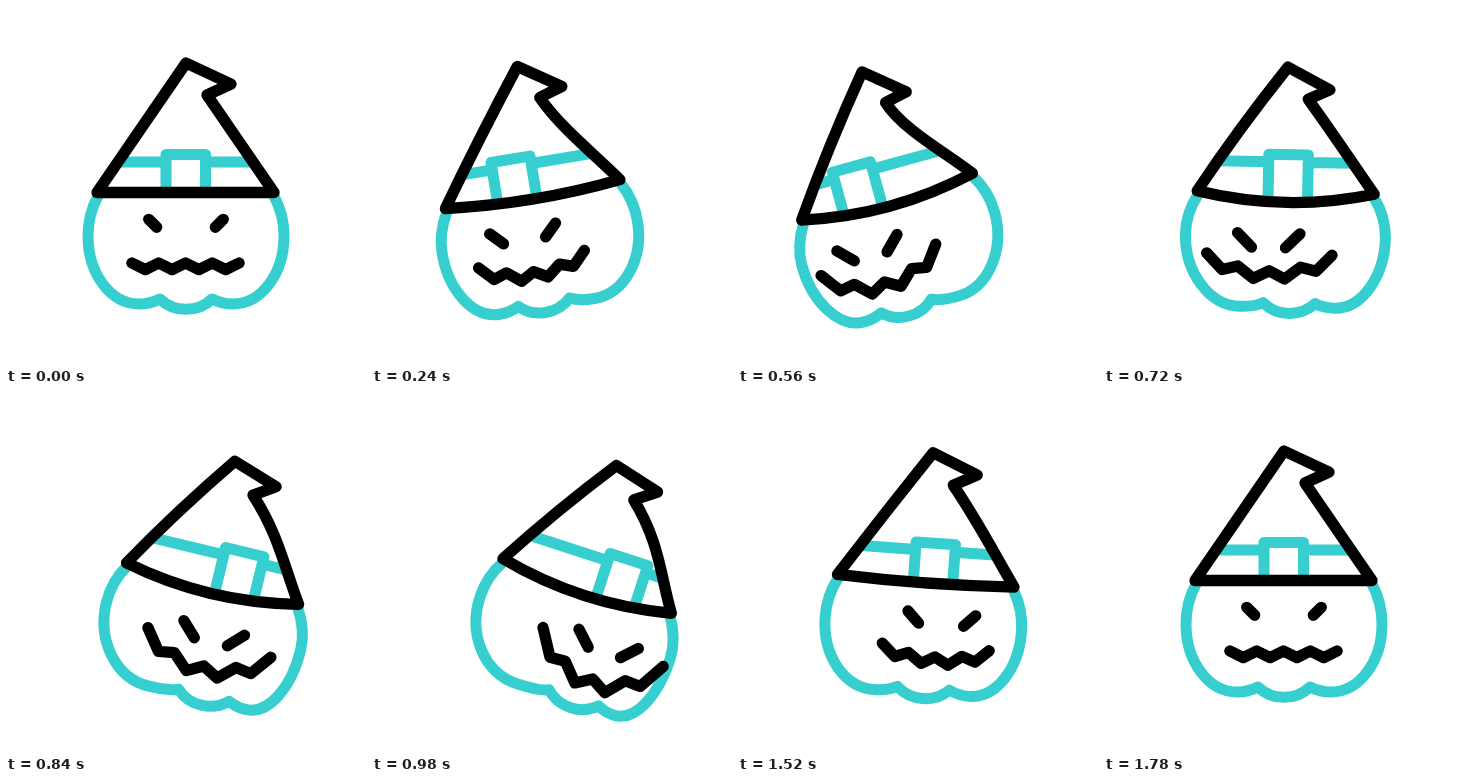
An HTML page for the animation above (2.4 s loop, 360 by 360 pixels).

```html
<!DOCTYPE html>
<html lang="en">
<head>
<meta charset="utf-8">
<title>Pumpkin in a hat</title>
<style>
html, body { margin: 0; width: 100%; height: 100%; overflow: hidden; background: #fff; }
svg { display: block; width: 100vw; height: 100vh; }
path { fill: none; stroke: #000; stroke-width: 11.3; stroke-linecap: round; stroke-linejoin: round; }
.teal { stroke: #36cece; stroke-width: 11; }
#belt { stroke-linecap: butt; }
</style>
</head>
<body>
<svg viewBox="0 0 360 360">
  <g id="head">
    <path id="body" class="teal"/>
    <path id="belt" class="teal"/>
    <path id="hat"/>
    <path id="eyes"/>
    <path id="mouth"/>
  </g>
</svg>
<script>
const LOOP = 2400, STEP = 20, END = 1770, MID = 180;

const el = id => document.getElementById(id);
const setPath = (id, d) => el(id).setAttribute('d', d);
const pt = (x, y) => x.toFixed(2) + ' ' + y.toFixed(2) + ' ';

// 0 before a, 1 after b, smooth between
function ease(t, a, b) {
  const p = Math.min(1, Math.max(0, (t - a) / (b - a)));
  return p * p * (3 - 2 * p);
}

// lean left, swing over to the right, settle back; the face follows later than the body
function poseAt(t) {
  return {
    tilt: -18.5 * ease(t, 0, 475) + 36.5 * ease(t, 475, 942) - 18 * ease(t, 960, END),
    sag: ease(t, 0, 480) - ease(t, 960, END),
    eyeX: -32 * ease(t, 0, 480) + 70 * ease(t, 590, 1020) - 38 * ease(t, 1250, END),
    eyeY: 15 * ease(t, 0, 480) + 5 * ease(t, 480, 980) - 20 * ease(t, 1100, END),
    squint: ease(t, 0, 400) - ease(t, 1300, END),
    mouthX: -25 * ease(t, 0, 500) + 60 * ease(t, 620, 1010) - 35 * ease(t, 1210, END),
    wide: 1 + 0.18 * (ease(t, 240, 800) - ease(t, 950, 1500)),
    grin: 0.9 * ease(t, 0, 480) - 0.3 * ease(t, 480, 720) + 0.6 * ease(t, 720, 980) - 1.2 * ease(t, 1080, END)
  };
}

function bodyPath(turn, sag) {
  const low = 4 * sag + 0.55 * turn, drop = 4 * sag;
  const bottom = 298 + 0.8 * drop, notch = 293 + drop;

  // one cheek, from the brim round to the notch below
  function cheek(dir) {
    const lead = dir * low, size = Math.abs(low);
    const side = 98 + 2 * sag + 0.03 * dir * turn;
    const at = (out, y) => pt(MID + dir * out, y);
    return 'M' + at(88, 190) +
      'C' + at(95 + sag, 203) + at(side, 216) + at(side, 230) +
      'C' + at(side, 268) + at(75 + 0.35 * lead + 0.25 * size, bottom) +
      at(47 + 0.65 * lead + 0.15 * size, bottom) +
      'C' + at(39 + lead, bottom) + at(32 + lead, notch + 3) + at(26 + lead, notch);
  }

  return cheek(1) + cheek(-1) +
    'C' + pt(MID - 12 + low, notch + 13.8) + pt(MID + 12 + low, notch + 13.8) + pt(MID + 26 + low, notch);
}

function hatPath(a, sag) {
  const tip = [180 - 0.55 * a, 57 + 4 * sag + 0.1 * a];
  const hook = [225 - 3 * sag - 0.25 * a, 78 + 5.5 * sag - 0.45 * a];
  const nook = [201 - 0.6 * sag - 0.17 * a, 89 + 4 * sag - 0.15 * a];
  const left = [91, 186.5], right = [268, 186.5];
  const mix = (p, q, f, dx) => pt(p[0] + (q[0] - p[0]) * f + dx, p[1] + (q[1] - p[1]) * f);
  return 'M' + pt(...left) + 'Q' + pt(179.5, 186.5 + 20 * sag) + pt(...right) +
    'C' + mix(right, nook, 1 / 3, 0.1 * a) + mix(right, nook, 2 / 3, 0.78 * a) + pt(...nook) +
    'L' + pt(...hook) + 'L' + pt(...tip) +
    'Q' + mix(tip, left, 0.5, -4 * sag) + pt(...left) + 'Z';
}

function beltPath(turn, sag) {
  const l = 160 + turn, r = 199.5 + turn, base = 186 + 8 * sag;
  return 'M' + pt(113, 156) + 'L' + pt(l, 156) + 'M' + pt(r, 156) + 'L' + pt(246, 156) +
    'M' + pt(l, base) + 'L' + pt(l, 148.5) + 'L' + pt(r, 148.5) + 'L' + pt(r, base);
}

function eyesPath(s) {
  const gap = 33.3 - 9.2 * s.squint, h = 4 + 3.1 * s.squint;
  const x = MID + s.eyeX, y = 217.3 + s.eyeY;
  const eye = dir => 'M' + pt(x + dir * (gap + h), y - h) + 'L' + pt(x + dir * (gap - h), y + h);
  return eye(-1) + eye(1);
}

// zigzag laid over a parabola that deepens with the grin
function mouthPath(s) {
  const points = [];
  for (let i = -4; i <= 4; i++) {
    const zig = i % 2 ? 1 : -1;
    points.push(pt(
      179.5 + s.mouthX + i * 13.4 * s.wide,
      260.3 + zig * (3.3 + 2 * s.grin) + s.grin * (15.5 - 1.75 * i * i)
    ));
  }
  return 'M' + points.join('L');
}

function draw(t) {
  const s = poseAt(t), turn = 1.75 * s.tilt;
  el('head').setAttribute('transform', `rotate(${s.tilt.toFixed(3)} 180 302)`);
  setPath('body', bodyPath(turn, s.sag));
  setPath('belt', beltPath(turn, s.sag));
  setPath('hat', hatPath(s.tilt, s.sag));
  setPath('eyes', eyesPath(s));
  setPath('mouth', mouthPath(s));
}

const start = performance.now();
function tick() {
  const t = (performance.now() - start) % LOOP;
  draw(Math.floor(t / STEP) * STEP);
  requestAnimationFrame(tick);
}
tick();
</script>
</body>
</html>
```
